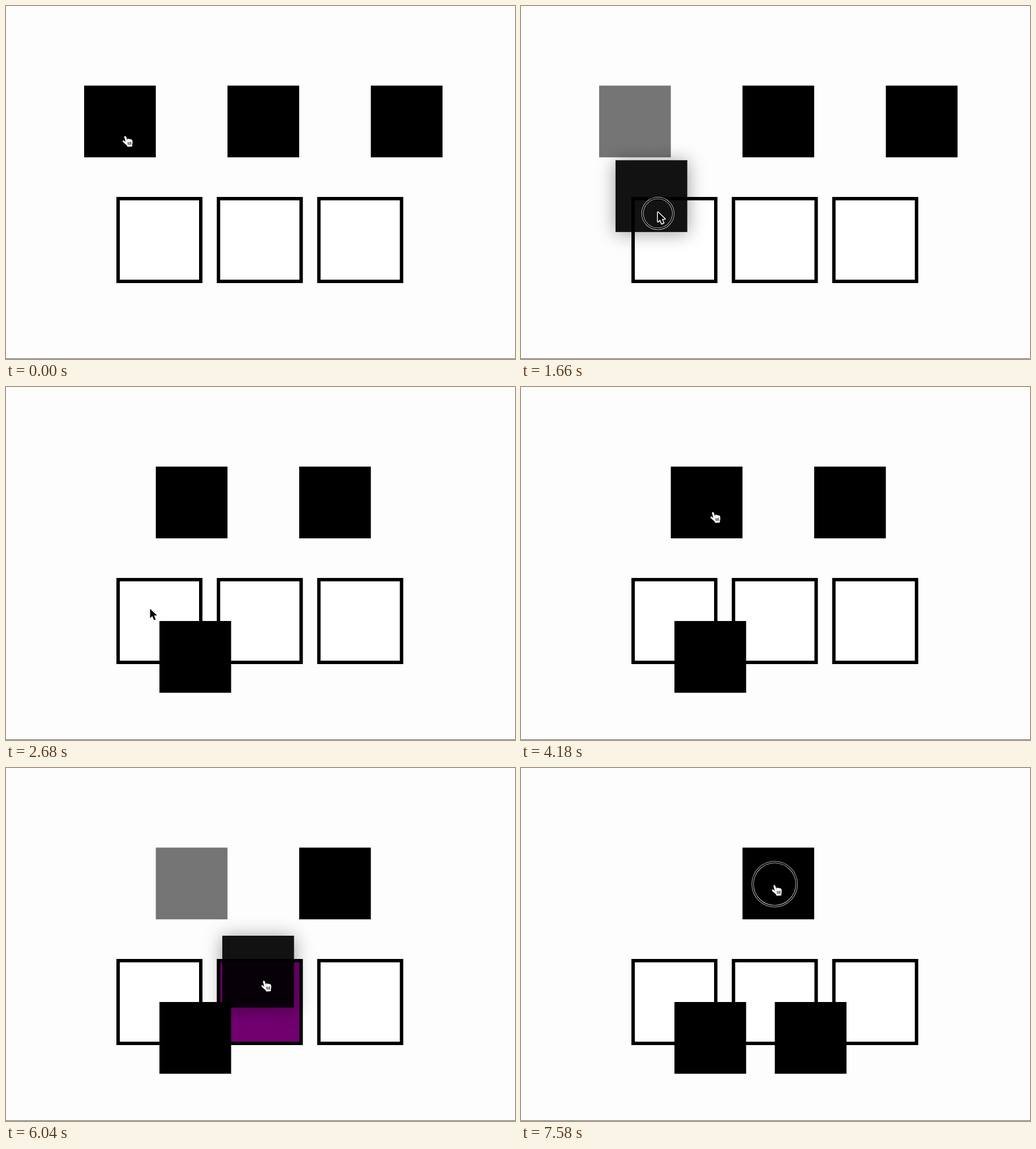
An HTML page with a canvas that plays this animation: 899 px wide and 623 px high, repeating every 8 s.

```html
<!DOCTYPE html>
<html lang="en">
<head>
<meta charset="utf-8">
<title>Drag and drop</title>
<style>
  html, body { margin: 0; width: 100%; height: 100%; overflow: hidden; background: #fdfdfd; }
  canvas { display: block; }
</style>
</head>
<body>
<canvas id="stage" width="899" height="623"></canvas>
<script>
const ctx = document.getElementById('stage').getContext('2d');
const LOOP = 8000;
const SIDE = 126.6, TOP = 140.5, PITCH = 253.2, MIDDLE = 454.5;
const SLOT = { x: 195, y: 337, size: 152, step: 177.3, border: 6 };

// bend > 1 delays the horizontal part of a move
const drags = [
  { start: 1140, dur: 800, over: 1690, release: 1960, drop: 2460, to: [189.5, 323.5], bend: 1.75 },
  { start: 4900, dur: 700, over: 5340, release: 5720, drop: 6140, to: [382, 296], bend: 0.88 }
];
const moves = [
  { start: 20, dur: 190, to: [202, 209.5], bend: 1 },
  { start: 1140, dur: 690, to: [254.5, 391.5], bend: 1.7 },
  { start: 3200, dur: 740, to: [338.5, 242], bend: 1 },
  { start: 4040, dur: 170, to: [338.5, 218.5], bend: 1 },
  { start: 4900, dur: 605, to: [455, 375], bend: 0.8 },
  { start: 6740, dur: 580, to: [447, 206], bend: 1 }
];
const rings = [
  { show: 300, press: 1140, hide: 1960 },
  { show: 4220, press: 4900, hide: 5720 },
  { show: 7330, press: Infinity, hide: Infinity }
];

const progress = (t, start, dur) => Math.min(1, Math.max(0, (t - start) / dur));
const ease = p => p * p * (3 - 2 * p);
const mix = (a, b, p) => a + (b - a) * p;

function travel(t, from, move) {
  const p = ease(progress(t, move.start, move.dur));
  return [mix(from[0], move.to[0], p ** move.bend), mix(from[1], move.to[1], p)];
}

function pointerAt(t) {
  let pos = [210, 229];
  for (const move of moves) {
    if (t < move.start) break;
    pos = travel(t, pos, move);
  }
  return pos;
}

const squareX = (i, count) => MIDDLE - SIDE / 2 + (i - (count - 1) / 2) * PITCH;
const slotX = i => SLOT.x + i * SLOT.step;

function box(x, y, w, h, color) {
  ctx.fillStyle = color;
  ctx.fillRect(x, y, w, h);
}

function drawSlot(i, active) {
  const { y, size, border } = SLOT, x = slotX(i);
  box(x, y, size, size, '#000');
  box(x + border, y + border, size - 2 * border, size - 2 * border, active ? '#720070' : '#fff');
}

function drawGhost(x, y, alpha) {
  ctx.save();
  ctx.globalAlpha = alpha;
  box(x, y, SIDE, SIDE, '#000');
  // the shadow falls only outside the square
  ctx.beginPath();
  ctx.rect(0, 0, 899, 623);
  ctx.rect(x, y, SIDE, SIDE);
  ctx.clip('evenodd');
  ctx.shadowColor = 'rgba(0,0,0,0.42)';
  ctx.shadowBlur = 30;
  ctx.shadowOffsetY = 2;
  box(x, y, SIDE, SIDE, '#000');
  ctx.restore();
}

function drawRing(x, y, radius, alpha) {
  ctx.save();
  ctx.globalAlpha = alpha;
  ctx.beginPath();
  ctx.arc(x, y, radius, 0, Math.PI * 2);
  ctx.strokeStyle = '#e4e4e4';
  ctx.lineWidth = 3.8;
  ctx.stroke();
  ctx.strokeStyle = '#000';
  ctx.lineWidth = 2.2;
  ctx.stroke();
  ctx.restore();
}

const arrow = new Path2D('M0 0V16.5L3.9 12.8L6.9 20L10 18.7L7 11.7H12.3Z');
const hand = new Path2D('M0 .5Q1.5 0 2.2 2L4.2 8L4.4 5.5Q6 4.3 7 6Q8.8 4.8 9.8 6.5' +
  'Q12 5.5 13 8Q14.2 11 13 15L12.6 19L4.6 19.5Q3 16 .5 14.5Q-4 11 -4 9' +
  'Q-3 7.5 -.5 9.5L1.2 11L-1 3Q-1.8 1 0 .5Z');
const knuckles = new Path2D('M5.5 11L6 16M8 11L8.3 16M10.5 10.5L10.6 16');

function drawPointer(x, y, isHand) {
  const shape = isHand ? hand : arrow;
  ctx.save();
  ctx.translate(x, y);
  ctx.lineJoin = 'round';
  ctx.lineWidth = isHand ? 2 : 3;
  ctx.strokeStyle = isHand ? '#000' : '#fff';
  ctx.fillStyle = isHand ? '#fff' : '#000';
  ctx.stroke(shape);
  ctx.fill(shape);
  if (isHand) {
    ctx.lineWidth = 1;
    ctx.stroke(knuckles);
  }
  ctx.restore();
}

function draw(t) {
  const dropped = drags.filter(d => t >= d.drop).length;
  const drag = drags.find(d => t >= d.start && t < d.drop);
  const count = 3 - dropped;

  box(0, 0, 899, 623, '#fdfdfd');
  box(0, 622, 899, 1, '#62645a');

  for (let i = 0; i < count; i++) {
    box(squareX(i, count), TOP, SIDE, SIDE, drag && i === 0 ? '#757575' : '#000');
  }
  for (let i = 0; i < 3; i++) drawSlot(i, drag && i === dropped && t >= drag.over);
  for (let i = 0; i < dropped; i++) box(slotX(i) + 76, 413, SIDE, SIDE, '#000');

  if (drag) {
    const [gx, gy] = travel(t, [squareX(0, count), TOP], drag);
    drawGhost(gx, gy, 0.93 * progress(t, drag.start + 220, 260));
  }

  const [x, y] = pointerAt(t);
  const isHand = drag ? t >= drag.release + 160 : y < 262;

  const ring = rings.find(r => t >= r.show && t < r.hide + 200);
  if (ring) {
    const grow = ease(progress(t, ring.show, 250));
    const press = ease(progress(t, ring.press, 180));
    const fade = 1 - progress(t, ring.hide, 200);
    const radius = mix(mix(27.2, 38.8, grow), 27.2, press);
    drawRing(x + 1 - press, y - 1 + 3 * press, radius, grow * fade);
  }
  drawPointer(x, y, isHand);
}

const origin = performance.now();
function tick() {
  draw((performance.now() - origin) % LOOP);
  requestAnimationFrame(tick);
}
tick();
</script>
</body>
</html>
```
